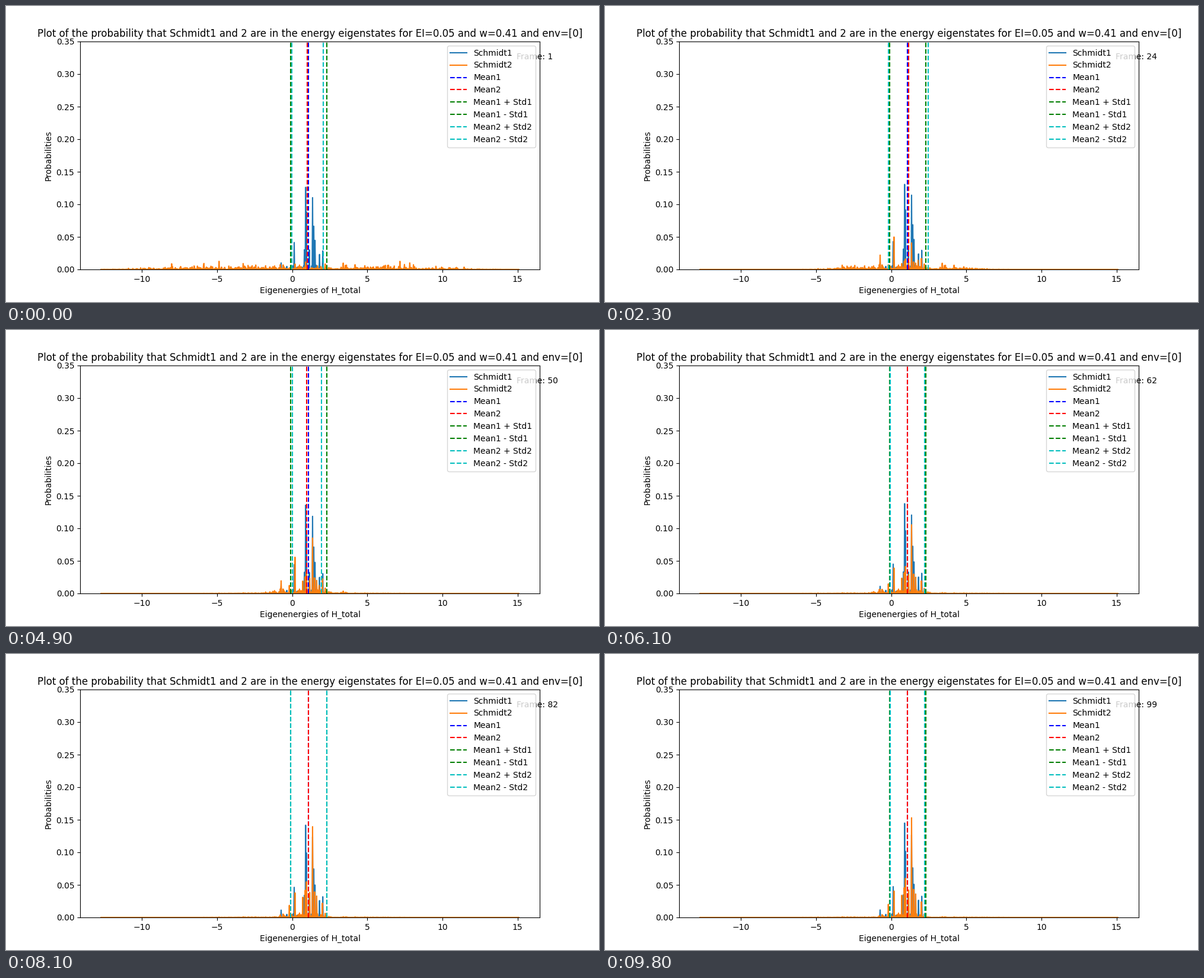
A matplotlib script that plays this animation: 1000x500 px, repeating every 9900 ms.

```python
import numpy as np
import matplotlib.pyplot as plt
from matplotlib.animation import FuncAnimation

plt.rcParams["font.family"] = "DejaVu Sans"

FRAMES = 99
E_MIN, E_MAX = -12.727, 15.088
MEAN1, STD1 = 1.088, 1.205

energy = np.linspace(E_MIN, E_MAX, 1024)
rng = np.random.default_rng(41)
chi1, chi2 = rng.normal(size=(2, energy.size)) ** 2

# Main energy levels and the heights of their peaks
STEADY = {-0.73: .010, 0.14: .040, 0.82: .030, 0.89: .126, 0.94: .088,
          1.14: .030, 1.36: .110, 1.44: .066, 1.51: .042, 1.81: .023, 2.03: .028}
RISING = {-0.18: .018, 0.18: .035, 0.71: .034, 0.87: .045, 0.95: .060,
          1.16: .042, 1.36: .153, 1.48: .043, 1.62: .036, 2.02: .024}
PASSING = {-0.73: .031, 0.18: .050, 1.80: .020, 2.02: .015}


def window(width, power=6):
    return np.exp(-np.abs((energy - 0.8) / width) ** power)


def add_peaks(prob, peaks, scale):
    for level, height in peaks.items():
        prob[np.abs(energy - level).argmin()] += scale * height


def schmidt1(t):
    prob = .0011 * chi1 * window(1.3)
    add_peaks(prob, STEADY, 1 + 0.15 * t / FRAMES)
    return prob


def schmidt2(t):
    # Broad noise contracts towards the middle while the main peaks grow
    width = 1.4 + 9.6 * np.exp(-t / 23)
    prob = chi2 * (.0013 * window(width) + .0002 * window(5.5, 4))
    add_peaks(prob, RISING, min(t / 90, 1))
    add_peaks(prob, PASSING, np.exp(-((t - 36) / 20) ** 2))
    return prob


def stats2(t):
    std = np.interp(t, [1, 24, 38, 62, 73, 91, 99],
                    [1.045, 1.323, 0.79, 1.15, 1.15, 1.24, 1.15])
    return 0.49 + 0.504 * std, std


fig, ax = plt.subplots(figsize=(10, 5), dpi=100)
curve1, = ax.plot(energy, schmidt1(1), label="Schmidt1")
curve2, = ax.plot(energy, schmidt2(1), label="Schmidt2")


def marker(x, color, label):
    return ax.axvline(x, color=color, linestyle="--", label=label)


marker(MEAN1, "b", "Mean1")
mean2 = marker(1, "r", "Mean2")
marker(MEAN1 + STD1, "g", "Mean1 + Std1")
marker(MEAN1 - STD1, "g", "Mean1 - Std1")
upper2 = marker(2, "c", "Mean2 + Std2")
lower2 = marker(0, "c", "Mean2 - Std2")

margin = 0.05 * (E_MAX - E_MIN)
ax.set_xlim(E_MIN - margin, E_MAX + margin)
ax.set_ylim(0, 0.35)
ax.set_xlabel("Eigenenergies of H_total")
ax.set_ylabel("Probabilities")
ax.set_title("Plot of the probability that Schmidt1 and 2 are in the energy "
             "eigenstates for EI=0.05 and w=0.41 and env=[0]")
ax.legend(loc="upper right")
counter = ax.text(0.95, 0.95, "", transform=ax.transAxes, va="top")


def update(i):
    t = i + 1
    curve1.set_ydata(schmidt1(t))
    curve2.set_ydata(schmidt2(t))
    mean, std = stats2(t)
    for line, x in ((mean2, mean), (upper2, mean + std), (lower2, mean - std)):
        line.set_xdata([x, x])
    counter.set_text(f"Frame: {t}")
    return curve1, curve2, mean2, upper2, lower2, counter


anim = FuncAnimation(fig, update, frames=FRAMES, interval=100, repeat=True,
                     repeat_delay=0, blit=False)
plt.show()
```
